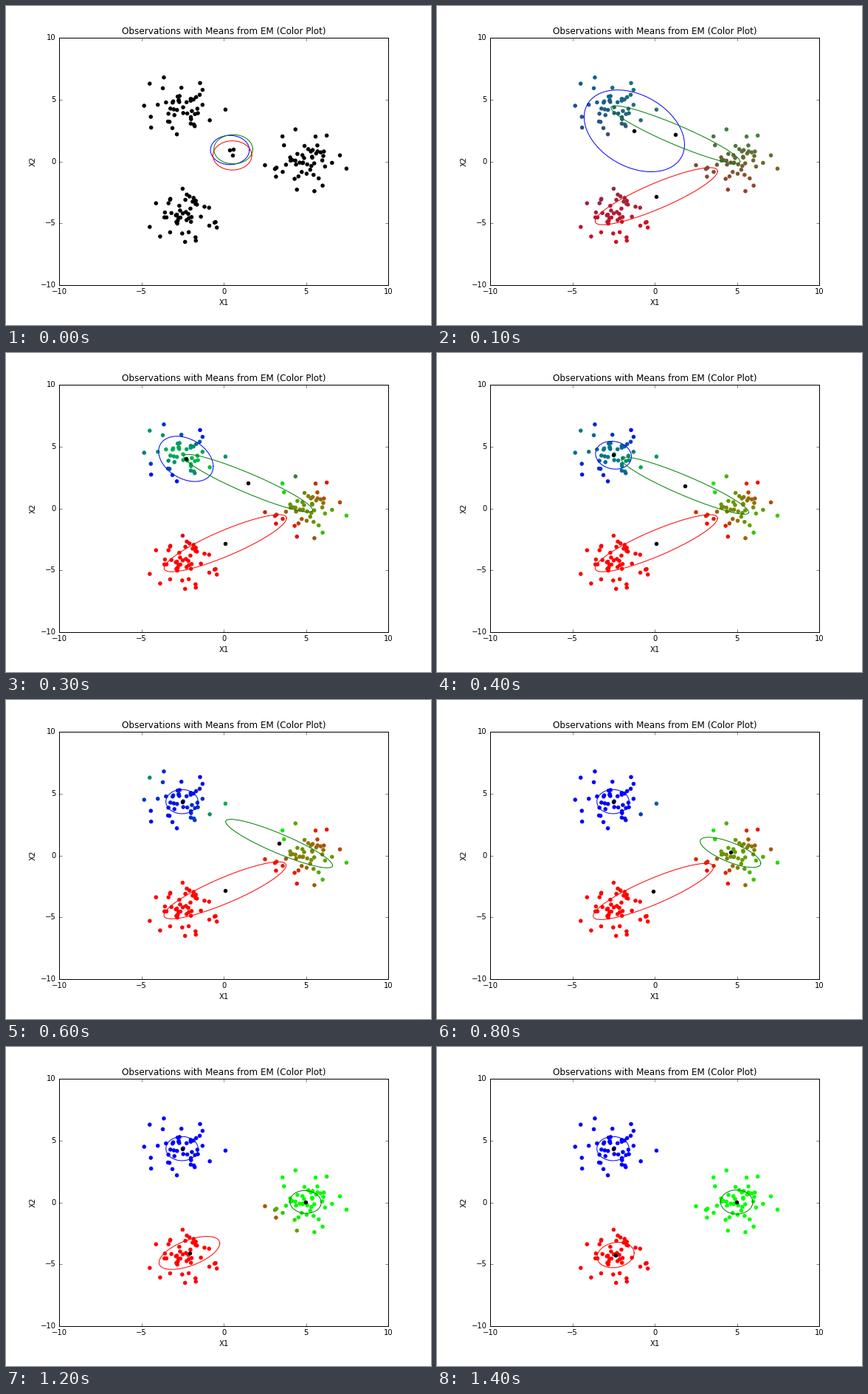
A matplotlib script that plays this animation: 576 by 432 pixels, repeating every 2.6 s.

```python
import numpy as np
import matplotlib.pyplot as plt
from matplotlib.animation import FuncAnimation

plt.style.use("classic")
plt.rcParams.update({
    "font.family": "DejaVu Sans", "font.size": 10,
    "axes.titlesize": 12, "axes.labelsize": 10,
})

STEP_MS, LOOP_MS, LAST_STEP = 100, 2600, 14
LINE_COLORS = ["blue", "green", "red"]
RGB = np.array([[0, 0, 1], [0, 1, 0], [1, 0, 0]])

# Upper, right and lower cluster.
CENTERS = np.array([(-2.54, 4.36), (4.97, .04), (-2.42, -4.27)])
START_MEANS = [(.37, .93), (.575, .99), (.52, .49)]
START_RADIUS = 1.18
OUTLIERS = [(.1, 4.2), (-3.64, 6.8), (-4.5, 6.3), (-2.85, 2.2),
            (4.35, 2.6), (6.25, 2.1), (7.05, .5), (2.5, -.3), (3.2, -.5),
            (5.5, -2.4), (6, -1.95), (-.5, -4.9), (-2.35, -6.5),
            (-1.7, -6.4), (-2.5, -2.2)]


def make_points(per_cluster=45):
    rng = np.random.default_rng(12)
    clusters = []
    for center in CENTERS:
        sample = rng.normal(size=(per_cluster, 2))
        sample = (sample - sample.mean(axis=0)) / sample.std(axis=0)
        clusters.append(center + .9 * sample)
    return np.vstack([*clusters, OUTLIERS])


def fade(step, middle, width):
    return 1 / (1 + np.exp((step - middle) / width))


def fit(step):
    """Means and covariances of the blue, green and red component."""
    if step == 0:
        return [(np.array(m), START_RADIUS ** 2 * np.eye(2))
                for m in START_MEANS]
    # Each component lets go of the clusters that are not its own.
    stray = fade(step, 2.3, .45)
    upper = .5 * fade(step, 5.7, 1.05)
    right = .34 * fade(step, 10.3, .9)
    shares = [(1 - .32 * stray, .18 * stray, .14 * stray),
              (upper, 1 - upper, 0),
              (0, right, 1 - right)]
    within = [.95, .95 - .4 * fade(step, 11.5, .6), .95]
    result = []
    for share, variance in zip(np.array(shares), within):
        mean = share @ CENTERS
        offset = CENTERS - mean
        result.append((mean, variance * np.eye(2)
                       + 1.05 * (offset.T * share) @ offset))
    return result


def responsibilities(points, components, weights):
    density = []
    for (mean, cov), weight in zip(components, weights):
        d = points - mean
        dist = np.sum(d @ np.linalg.inv(cov) * d, axis=1)
        density.append(weight * np.exp(-dist / 2) / np.sqrt(np.linalg.det(cov)))
    density = np.array(density).T
    return density / density.sum(axis=1, keepdims=True)


def make_colors(points, fits):
    colors = [np.zeros((len(points), 3))]
    weights = np.full(3, 1 / 3)
    for components in fits[:-1]:
        parts = responsibilities(points, components, weights)
        weights = parts.mean(axis=0)
        colors.append(np.clip(parts @ RGB, 0, 1))
    return colors


def ellipse(mean, cov):
    t = np.linspace(0, 2 * np.pi, 200)
    sx, sy = np.sqrt(np.diag(cov))
    tilt = np.arccos(cov[0, 1] / (sx * sy))
    return mean[0] + sx * np.cos(t), mean[1] + sy * np.cos(t - tilt)


points = make_points()
fits = [fit(step) for step in range(LAST_STEP + 1)]
colors = make_colors(points, fits)

fig = plt.figure(figsize=(8, 6), dpi=72, facecolor="white")
ax = fig.add_axes([.125, .125, .775, .775])
ax.set(xlim=(-10, 10), ylim=(-10, 10), xlabel="X1", ylabel="X2",
       xticks=range(-10, 11, 5), yticks=range(-10, 11, 5),
       title="Observations with Means from EM (Color Plot)")

dots = ax.scatter(*points.T, s=20, c="black", linewidths=1, zorder=2)
means = ax.scatter(*np.transpose(START_MEANS), s=20, c="black",
                   linewidths=1, zorder=4)
outlines = [ax.plot([], [], color=c, lw=1, zorder=3)[0] for c in LINE_COLORS]


def update(frame):
    step = min(frame, LAST_STEP)
    dots.set_facecolors(colors[step])
    dots.set_edgecolors(colors[step])
    means.set_offsets([mean for mean, _ in fits[step]])
    for outline, component in zip(outlines, fits[step]):
        outline.set_data(*ellipse(*component))
    return [dots, means, *outlines]


anim = FuncAnimation(fig, update, frames=LOOP_MS // STEP_MS,
                     interval=STEP_MS, repeat=True, repeat_delay=0)
plt.show()
```
